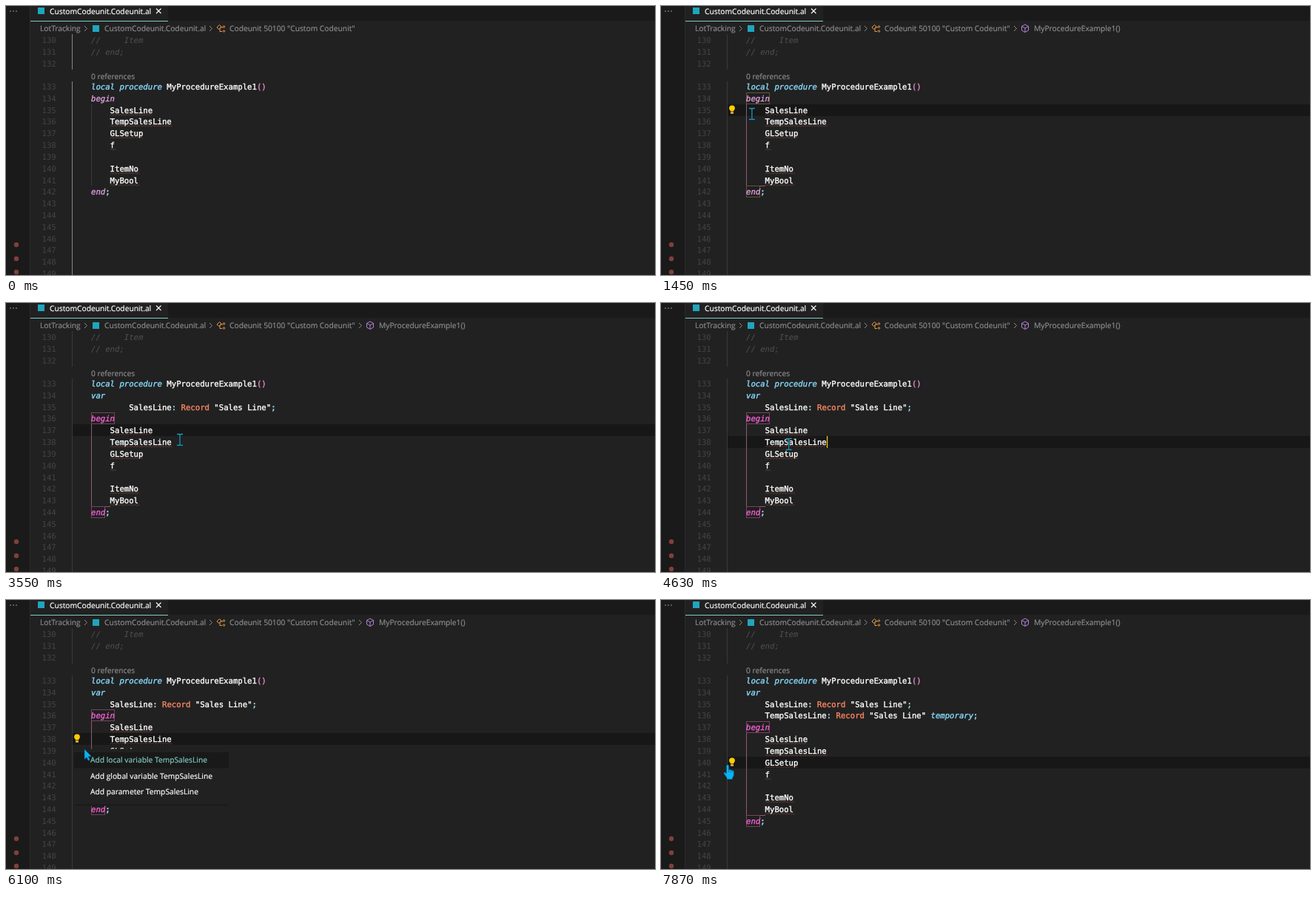
Write an HTML page that moves like this. It is 877x364 px and loops after 8000 ms.

```html
<!DOCTYPE html>
<html lang="en">
<head>
<meta charset="utf-8">
<style>
html, body { margin: 0; height: 100%; overflow: hidden; background: #212121; }
svg { display: block; width: 877px; height: 364px; }
text { white-space: pre; text-rendering: geometricPrecision; font: 10.25px "Open Sans", "Noto Sans", sans-serif; color: #8c8c8c; }
text, tspan { fill: currentColor; stroke: currentColor; stroke-width: .2; }
.code { font: 10.63px "DejaVu Sans Mono", "Noto Sans Mono", monospace; color: #fff; }
.code, .code tspan { stroke-width: .35; }
.code.num { color: #444; stroke: none; }
.code.com { color: #505050; font-style: italic; stroke: none; }
.key { color: #89ddff; font-style: italic; }
.block { color: #dd9fdc; font-style: italic; }
.hot { color: #f35fd2; font-style: italic; }
.punct { color: #a9e2fb; }
.paren { color: #e58ac8; }
.type { color: #fb8763; }
.white { color: #fff; }
.teal { color: #80cbc4; }
</style>
</head>
<body>
<svg id="stage" viewBox="0 0 877 364"></svg>
<script>
const LINE = 15.82, CHAR = 6.4, LEFT = 115, LOOP = 8000;
const PROC = 'MyProcedureExample1';
const WORDS = ['SalesLine', 'TempSalesLine', 'GLSetup', 'f', '', 'ItemNo', 'MyBool'];
const INSERT1 = 2850, FORMAT = 3850, INSERT2 = 6530;

// Pointer path: time, x, y
const PATH = [
  [0, 692, 380], [130, 686, 362], [820, 160, 142], [990, 160, 142],
  [1450, 123, 146], [1680, 103, 145], [1760, 96, 140], [1830, 93, 137],
  [2060, 95, 140], [2450, 155, 158], [2600, 166, 166], [2770, 166, 168],
  [3550, 235, 185], [4080, 235, 185], [4240, 240, 175], [4400, 225, 182],
  [4630, 173, 191], [4860, 108, 194], [4940, 106, 193], [5250, 97, 182],
  [5480, 97, 182], [5550, 91, 193], [5710, 91, 193], [5870, 106, 202],
  [6100, 106, 202], [6400, 126, 215], [6870, 172, 226], [6950, 174, 225],
  [7100, 174, 227], [7410, 174, 227], [7870, 90, 223]
];
// Last entry whose start time has passed
const at = (list, t) => list.filter(e => e[0] <= t).pop();
const POINTERS = [
  [0, 'beam'], [1690, 'hand'], [2060, 'arrow'], [2770, 'beam'], [5100, 'hand'],
  [5750, 'arrow'], [6450, 'beam'], [7800, 'hand']
];
const ACTIVE = [[0, -1], [990, 2], [INSERT1, 4], [FORMAT, 5], [INSERT2, 6], [7100, 7]];
const between = (t, a, b) => t >= a && t < b;

const text = (x, y, s, cls = '') => `<text x="${x}" y="${y + 4}" class="${cls}">${s}</text>`;
const span = (cls, s) => `<tspan class="${cls}">${s}</tspan>`;
const rect = (x, y, w, h, fill, extra = '') =>
  `<rect x="${x}" y="${y}" width="${w}" height="${h}" fill="${fill}" ${extra}/>`;
const path = (d, stroke, fill = 'none', w = 1) =>
  `<path d="${d}" stroke="${stroke}" fill="${fill}" stroke-width="${w}"/>`;
const chevron = x => path(`M${x - 2} 27l3.5 3.5l-3.5 3.5`, '#8c8c8c');
const rowY = i => Math.round(109 + i * LINE);

function squiggle(x, y, chars) {
  const n = Math.max(1, Math.round(chars * CHAR / 4));
  return path(`M${x} ${y}` + 'l2 -1.5l2 1.5'.repeat(n), '#81463f', 'none', .7);
}

function chrome(inside) {
  let s = rect(0, 0, 877, 364, '#212121') + rect(0, 0, 32, 364, '#1a1a1a') +
    rect(32, 0, 1, 364, '#2a2a2a') + rect(219, 0, 658, 20, '#1a1a1a') +
    rect(33, 20, 186, 1, '#80cbc4');
  for (const x of [6, 10, 14]) s += `<circle cx="${x}" cy="7" r=".8" fill="#aaa"/>`;
  for (const y of [323, 342, 360]) s += `<circle cx="14" cy="${y}" r="3.2" fill="#80403b"/>`;
  const file = 'CustomCodeunit.Codeunit.al';
  s += rect(43, 2, 9, 9, '#20a5bd') + text(59, 6.5, file, 'white') +
    path('M203 3.5l6.5 6.5m0 -6.5l-6.5 6.5', '#fff', 'none', 1.1);
  s += text(46, 30, 'LotTracking') + chevron(108) + rect(117, 26, 9, 9, '#20a5bd') +
    text(133, 30, file) + chevron(277) +
    path('M285 29l3.5 -3.5l2.5 2.5l-3.5 3.5zM290 29h3m-4 1v4.5h3M293 28l1.5 -1.5l1.5 1.5l-1.5 1.5zM293 34l1.5 -1.5l1.5 1.5l-1.5 1.5z', '#ee9d48') +
    text(302, 30, 'Codeunit 50100 "Custom Codeunit"');
  if (inside) s += chevron(479) +
    path('M487.5 27.5l4.5 -2.5l4.5 2.5v5.5l-4.5 2.5l-4.5 -2.5zM487.5 27.5l4.5 2.5l4.5 -2.5M492 30v5.5', '#b180d7') +
    text(504, 30, PROC + '()');
  return s;
}

function declaration(name, tail = '') {
  return name + span('punct', ':') + ' ' + span('type', 'Record') + ' "Sales Line"' + tail + span('punct', ';');
}

function editor(t) {
  const inside = t >= 990, active = at(ACTIVE, t)[1];
  const vars = t < INSERT1 ? 0 : t < INSERT2 ? 2 : 3;
  const begin = 1 + vars, end = begin + WORDS.length + 1;
  const block = vars ? 'hot' : 'block', frame = vars ? '#75455d' : '#63563a';
  let s = '';
  if (inside) s += rect(89, rowY(active) - 8, 788, 16, '#171717');

  const guide = inside ? '#393939' : '#858585';
  s += rect(89, 38, 1, 48, guide) + rect(89, 102, 1, 262, guide);
  const top = rowY(begin) + 8, bottom = rowY(end) - 8;
  s += rect(115, top, 1, bottom - top, inside ? '#8f5a73' : '#393939');
  if (inside) {
    s += rect(115, bottom, 26, 1, '#8f5a73');
    for (const [i, w] of [[begin, 32], [end, 19]])
      s += rect(115.5, rowY(i) - 7.5, w - 1, 15, '#1f1f1f', `stroke="${frame}"`);
  }

  for (let i = 0; i < 20; i++) {
    const y = i < 3 ? Math.round(46 + i * LINE) : rowY(i - 3);
    s += text(48.5, y, 130 + i, 'code num');
  }
  const code = (i, col, str, cls = '') => text(LEFT + col * CHAR, rowY(i), str, 'code ' + cls);
  s += text(LEFT, 46, '//     Item', 'code com') + text(LEFT, 62, '// end;', 'code com') +
    text(LEFT, 95, '0 references') +
    code(0, 0, span('key', 'local procedure') + ` ${PROC}` + span('paren', '()'));
  if (vars) s += code(1, 0, 'var', 'key') + code(2, t < FORMAT ? 8 : 4, declaration('SalesLine'));
  if (vars > 2) s += code(3, 4, declaration('TempSalesLine', ' ' + span('key', 'temporary')));
  s += code(begin, 0, 'begin', block) + code(end, 0, span(block, 'end') + span('punct', ';'));
  WORDS.forEach((w, i) => {
    const row = begin + 1 + i;
    if (w) s += code(row, 4, w) + squiggle(LEFT + 4 * CHAR, rowY(row) + 7, w.length);
  });

  const caretX = between(t, 990, 1400) ? 159.5 :
    between(t, FORMAT, 4940) || between(t, INSERT2, 7100) ? 224 :
    between(t, 7100, 7410) ? 172.5 : 0;
  if (caretX) s += rect(caretX, rowY(active) - 8, 1.2, 16, '#ffcc00');
  if (between(t, 1370, INSERT1) || between(t, 5020, INSERT2) || t >= 7560) s += bulb(96, rowY(active));
  return s;
}

function bulb(x, y) {
  return `<g transform="translate(${x} ${y - 1})">` +
    path('M-2 2.5C-2 1 -3.9 .5 -3.9 -1.5A3.9 3.9 0 0 1 3.9 -1.5C3.9 .5 2 1 2 2.5z', 'none', '#ffcc00') +
    rect(-2, 3.2, 4, 2.6, '#d8b24a') + '</g>';
}

function menu(x, y, w, name) {
  let s = rect(x, y + 74, w, 3, '#1b1b1b') + rect(x, y, w, 75, '#212121') +
    rect(x, y + 4.5, w, 21.5, '#191919');
  ['local variable', 'global variable', 'parameter'].forEach((kind, i) => {
    s += text(x + 22, y + 14.5 + i * 21.5, `Add ${kind} ${name}`, i ? 'white' : 'teal');
  });
  return s;
}

const BEAM = 'M-4 -7.5h3l1 1l1 -1h3M0 -6.5v13M-4 7.5h3l1 -1l1 1h3';
const SHAPES = {
  beam: path(BEAM, '#111', 'none', 2.4) + path(BEAM, '#1c9cc4', 'none', 1.3),
  arrow: path('M0 0V13.5L3 10.7L5 15.3L7.2 14.4L5.2 9.8H9.5z', '#0a5f86', '#08b4f4', .5),
  hand: path('M-1.5 1Q0 -1 1.5 1V7Q3 5.5 4 7.3Q5.5 6.3 6.3 8Q8 7.3 8.3 9.3V14Q8 16 6.5 17.5V19.5H-1V17.5L-5 11.5Q-5 9.5 -3 10.5L-1.5 12z', '#0a5f86', '#08b4f4', .5) +
    path('M1.5 7v3M4 7.5v3M6.3 8.3v2.5', '#0a5f86', 'none', .6)
};

function pointer(t) {
  const from = at(PATH, t);
  const to = PATH.find(p => p[0] > t) || [LOOP, from[1], from[2]];
  const k = (t - from[0]) / (to[0] - from[0]);
  const [x, y] = [1, 2].map(i => from[i] + (to[i] - from[i]) * k);
  return `<g transform="translate(${x} ${y})">${SHAPES[at(POINTERS, t)[1]]}</g>`;
}

const stage = document.getElementById('stage');
function draw() {
  const t = performance.now() % LOOP;
  let s = chrome(t >= 990) + editor(t);
  if (between(t, 2060, 2770)) s += menu(98, 154.5, 184, 'SalesLine');
  if (between(t, 5750, 6450)) s += menu(92, 201.5, 209, 'TempSalesLine');
  stage.innerHTML = s + pointer(t);
  requestAnimationFrame(draw);
}
draw();
</script>
</body>
</html>
```
